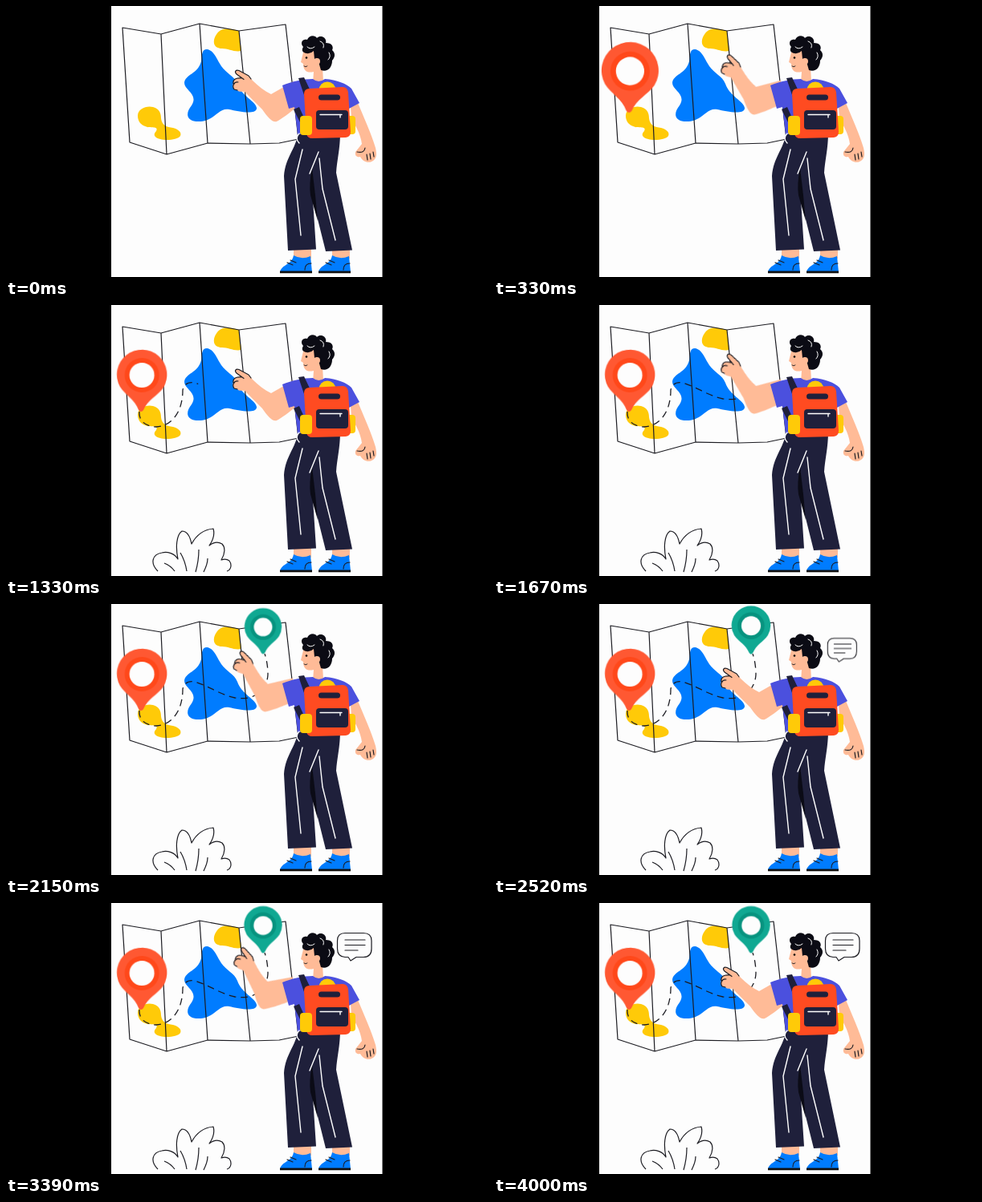
Animation of 600x338 px, one loop 4030 ms. Source, as an HTML page:

```html
<!DOCTYPE html>
<html lang="en">
<head>
<meta charset="utf-8">
<title>Traveller with a map</title>
<style>
html, body { margin: 0; width: 100%; height: 100%; overflow: hidden; background: #000; }
svg { display: block; width: 100vw; height: 100vh; }
:root { --loop: 4.03s; --ink: #1c1c22; --navy: #1f203b; --skin: #ffbb97; --yellow: #ffca08; --blue: #007cff; }

.ink { fill: none; stroke: var(--ink); stroke-width: 1.2; stroke-linecap: round; stroke-linejoin: round; }
.chalk { fill: none; stroke: #fff; stroke-width: 1.4; stroke-linecap: round; stroke-linejoin: round; }
.skin { fill: var(--skin); }
.navy { fill: var(--navy); }
.yellow { fill: var(--yellow); }
.blue { fill: var(--blue); }

/* three pointing gestures per loop, turning at the shoulder */
.arm { transform-origin: 363px 91px; animation: point calc(var(--loop) / 3) infinite; }
@keyframes point {
  0% { transform: rotate(0deg); animation-timing-function: ease-in-out; }
  37%, 50% { transform: rotate(19.5deg); animation-timing-function: ease-in-out; }
  88%, 100% { transform: rotate(0deg); }
}

.red { animation: popRed var(--loop) infinite ease-in-out; }
.green { animation: popGreen var(--loop) infinite ease-in-out; }
.bubble { transform-origin: 431px 72px; animation: popBubble var(--loop) infinite ease-in-out; }
@keyframes popRed {
  0% { transform: scale(0); }
  8.44% { transform: scale(1.14); }
  18.36%, 100% { transform: scale(1); }
}
@keyframes popGreen {
  0%, 47.15% { transform: scale(0); }
  55.58% { transform: scale(1.14); }
  65.51%, 100% { transform: scale(1); }
}
@keyframes popBubble {
  0%, 57.07% { transform: scale(0); }
  65.51% { transform: scale(1.14); }
  75.43%, 100% { transform: scale(1); }
}

/* drawn lines have a path length of 100 */
.bush path, .reveal { stroke-dasharray: 100 120; stroke-dashoffset: 102; }
.bush path { stroke-linecap: butt; animation: drawBush var(--loop) infinite linear; }
.reveal { fill: none; stroke: #fff; stroke-width: 6; animation: drawRoute var(--loop) infinite linear; }
.dashes { fill: none; stroke: var(--ink); stroke-width: 1.3; stroke-dasharray: 3.45 2.35; }
@keyframes drawBush {
  0%, 12.4% { stroke-dashoffset: 102; }
  31.8%, 100% { stroke-dashoffset: 0; }
}
@keyframes drawRoute {
  0%, 18.1% { stroke-dashoffset: 102; }
  49.1%, 100% { stroke-dashoffset: 0; }
}
</style>
</head>
<body>
<svg viewBox="0 0 600 338" preserveAspectRatio="none">
  <defs>
    <clipPath id="page"><rect x="131" width="337.5" height="338"/></clipPath>
    <!-- tip of the pin at 0,0 -->
    <g id="pin">
      <path d="M-3-2C-8-15-20-20-27-30.500A31.200 31.200 0 1 1 27-30.500C20-20 8-15 3-2Q0 2-3-2Z"/>
      <circle cy="-45.500" r="21.500" fill="var(--ring)"/>
      <circle cy="-45.500" r="15.500" fill="#fdfdfd"/>
    </g>
    <path id="route" pathLength="100" d="M166 133C165 146 176 152 187 152C206 151 220 134 220 106C222 97 229 96 235 97C252 102 266 113 285 117C309 121 325 108 326 88Q326 74 322 62"/>
    <mask id="drawn" maskUnits="userSpaceOnUse" x="131" y="0" width="338" height="338">
      <use href="#route" class="reveal"/>
    </mask>
    <g id="shoe">
      <path class="skin" d="M358 302H380V315H358Z"/>
      <path class="blue" d="M358 311Q368 317 379 312L381 332H341C343 322 356 323 358 311Z"/>
      <path d="M341 330.600H381V333.300H341Z" fill="#111"/>
      <path class="ink" d="M354 317L361 320M350 320L357 323M380 321Q372 321 372 329"/>
    </g>
  </defs>

  <rect width="600" height="338"/>
  <g clip-path="url(#page)">
    <rect x="131" width="338" height="338" fill="#fdfdfd"/>

    <!-- map -->
    <path class="yellow" d="M270 29Q278 27 290 31L293 56C284 58 277 53 269 53C258 53 257 44 261 37Q264 31 270 29Z"/>
    <path class="yellow" d="M164 137C164 128 175 124 183 126C191 128 193 134 193 140C194 149 200 151 208 152C215 154 219 158 217 162C214 167 199 168 192 166C184 164 183 160 187 156C190 150 182 152 176 151C168 149 164 144 164 137Z"/>
    <path class="blue" d="M250 54C259 55 262 66 268 75C274 84 284 87 288 97C293 112 311 119 312 127C313 136 290 132 278 129C264 126 260 144 240 144C224 144 223 134 231 124C240 110 222 105 222 96C223 85 239 85 243 69C244 60 244 54 250 54Z"/>
    <path class="ink" d="M145 27L193 35L241 22L290 31L348 23L364 166L340 171L304 172L251 171L200 185L154 170ZM193 35L200 185M241 22L251 171M290 31L304 172"/>
    <g mask="url(#drawn)"><use href="#route" class="dashes"/></g>
    <g transform="translate(168 133) rotate(1.500)" fill="#ff5832" style="--ring:#ff481a"><use href="#pin" class="red"/></g>
    <g transform="translate(320 62.500) scale(.758)" fill="#10a892" style="--ring:#07937f"><use href="#pin" class="green"/></g>

    <!-- bush, drawn from the right and from the ground up -->
    <g class="bush ink">
      <path pathLength="100" d="M275 332C281 330 281 323 278 319Q274 316 268 318C273 310 273 302 269 298C264 295 258 296 253 300C258 293 260 286 258 279C246 280 237 287 231 298C229 288 225 282 219 282C212 287 211 302 214 317C210 310 201 307 194 309C182 311 179 322 189 332"/>
      <path pathLength="100" d="M210 332Q205 325 197 322"/>
      <path pathLength="100" d="M225 332Q223 319 217 309"/>
      <path pathLength="100" d="M236 333Q240 319 240 305"/>
      <path pathLength="100" d="M246 333Q251 323 251 316"/>
    </g>

    <!-- legs -->
    <use href="#shoe"/>
    <use href="#shoe" x="48"/>
    <path class="navy" d="M364 158H416C416 178 412 192 411 208L431 304.500L398 306L382 242L386 303.500L351 305L346 212C348 188 360 180 364 158Z"/>
    <path d="M381 202Q377 222 379 236L388 268L385 236Z" fill="#0b0b16"/>
    <path class="chalk" d="M369 179L360 216L367 286M389 182L378 209M390 190L394 228L410 292"/>

    <!-- resting arm -->
    <path class="skin" d="M429 126L438 121C445 138 455 160 460 177C462 186 461 190 457 193C451 197 444 194 441 188C437 189 434 187 435 182L443 172C441 158 434 148 430 140Z"/>
    <path class="ink" d="M437 182Q446 184 447 177M449 185L450 192M453 184L454 191M457 182L458 188"/>

    <!-- pointing arm -->
    <g class="arm">
      <path class="skin" d="M358 94L330 110C322 106 314 100 307 93L303 88L290 80.500C286 79 284 82 287 85L293 90C287 89 283 91 283 96C281 100 283 105 288 105C290 108 295 106 297 107L319 129C326 139 332 146 337 144C343 141 352 134 362 126Z"/>
      <path class="ink" d="M305 91L302 87L290 80.500C286 79 284 82 287 85L296 91.500M293 90C286 89 282 92 283 97M289 95C284 94 281 100 284 104L288 105"/>
    </g>

    <!-- head -->
    <path class="skin" d="M371 54L367 70L370 72C370 81 375 84 383 82L382 96Q390 101 395 94L393 60L380 50Z"/>
    <path fill="#0b0b14" d="M374 59C368 58 368 54 370 51C366 47 368 40 375 42C377 36 385 36 387 40C392 35 400 40 398 46C406 46 408 51 406 55C411 59 409 65 406 68C406 77 400 83 392 80L390 73L388 66L384 66L383 56Q379 60 374 59Z"/>
    <circle class="skin" cx="387" cy="69" r="4"/>
    <circle cx="374" cy="64.500" r="1.300"/>
    <path class="ink" style="stroke-width:.9" d="M371 75Q373 77 375 75"/>
    <path class="chalk" style="stroke-width:1" d="M375 51Q379 55 384 51M391 44Q397 46 395 52M402 58Q405 63 401 67"/>

    <!-- shirt and backpack -->
    <path fill="#4b50de" d="M344 99C356 94 370 91 382 91Q389 97 397 91C412 92 424 97 430 103L440 121L427 128V160H363L359 126L352 128Z"/>
    <path class="navy" d="M364 90L371 89L380 108L372 114ZM358 129L365 126L374 146L368 149Z"/>
    <path class="chalk" d="M365 159Q359 165 365 171"/>
    <circle class="yellow" cx="400" cy="105" r="10.500"/>
    <rect class="yellow" x="422" y="137" width="13" height="23" rx="4"/>
    <path fill="#ff4b21" d="M378 103L419 101Q425 101 426 108L429 157Q429 163 423 164L381 165Q375 165 374 159L371 110Q371 103 378 103Z"/>
    <rect class="yellow" x="366" y="137" width="15" height="24" rx="4"/>
    <rect class="navy" x="389" y="110.500" width="27" height="7" rx="3.500"/>
    <rect class="navy" x="386" y="130" width="40" height="24" rx="4"/>
    <path class="chalk" d="M391 135.500H418M416 135.500V139"/>

    <!-- speech bubble -->
    <g class="bubble">
      <path class="ink" style="fill:#fdfdfd" d="M422 37.500H445Q455 37.500 455 47V57Q455 67.500 445 67.500H436L429 72L426 67.500H422Q412.500 67 412.500 57V47Q412.500 37.500 422 37.500Z"/>
      <path class="ink" d="M422 46H447M422 52.500H447M422 59H438"/>
    </g>
  </g>
</svg>
</body>
</html>
```
